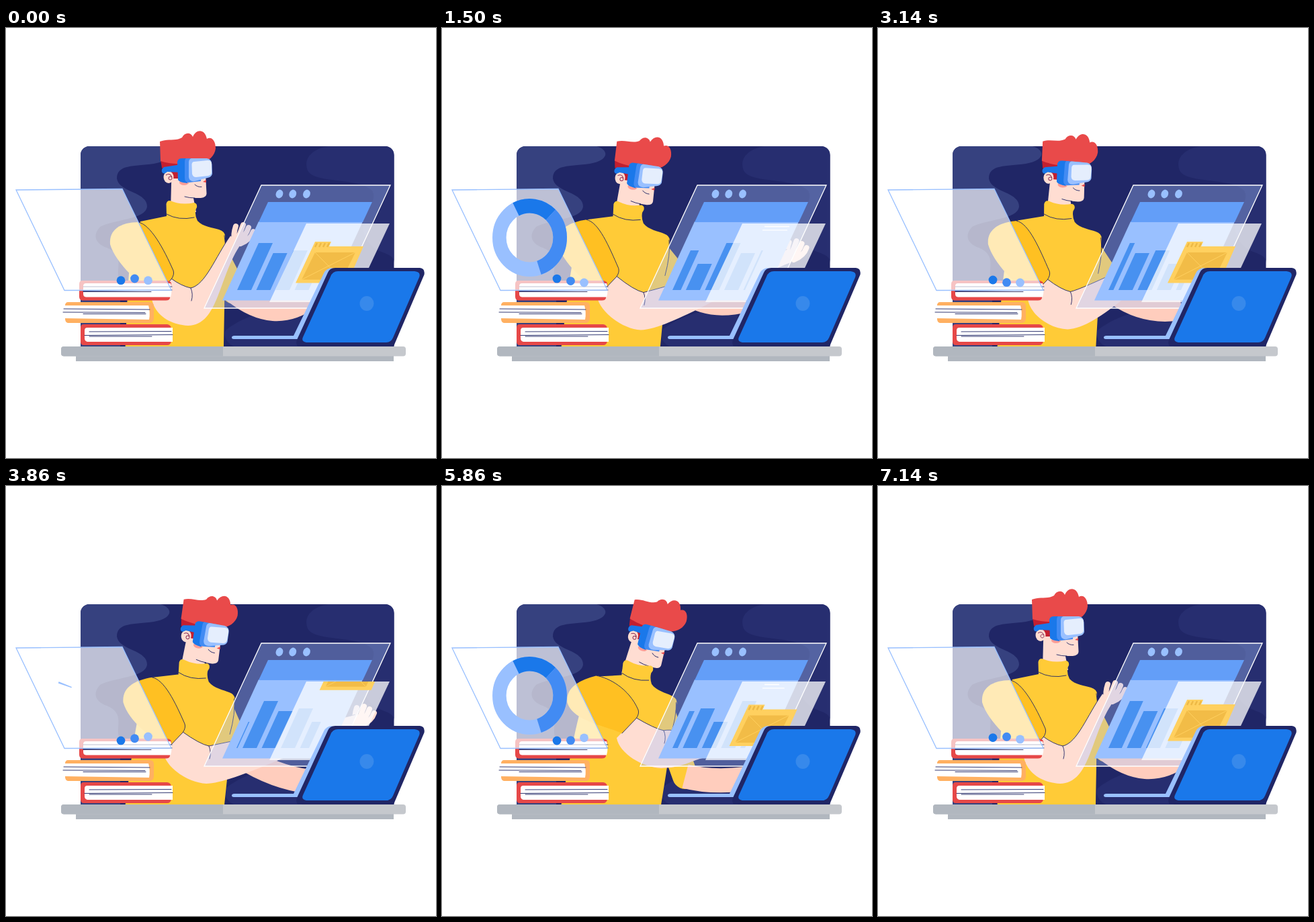
Animation, 640 px wide and 640 px high, one loop 7210 ms. Source, as an HTML page:

```html
<!DOCTYPE html>
<html lang="en">
<head>
<meta charset="utf-8">
<title>Virtual workspace</title>
<style>
html, body { margin: 0; width: 100%; height: 100%; overflow: hidden; background: #fff; }
svg { display: block; width: 100vw; height: 100vh; }
.ln { fill: none; stroke: #202666; stroke-width: .9; stroke-linecap: round; }
.ring circle { fill: none; stroke-width: 21.5; }
</style>
</head>
<body>
<svg viewBox="0 0 640 640" xmlns="http://www.w3.org/2000/svg">
  <defs>
    <clipPath id="screenClip"><rect x="111" y="176" width="466.500" height="310" rx="13"/></clipPath>
    <clipPath id="deskClip"><rect width="640" height="474"/></clipPath>
    <clipPath id="barClip"><rect x="343" y="300" width="108" height="90"/></clipPath>
    <clipPath id="cardClip"><path d="M447 291H571L516 408H392Z"/></clipPath>
    <mask id="ringMask" maskUnits="userSpaceOnUse" x="-70" y="-70" width="140" height="140">
      <circle id="reveal" r="47.200" fill="none" stroke="#fff" stroke-width="24" pathLength="360" transform="rotate(201) scale(1 -1)"/>
    </mask>
  </defs>

  <g clip-path="url(#deskClip)">
    <g clip-path="url(#screenClip)">
      <path fill="#202666" d="M111 176H578V474H111Z"/>
      <path fill="#36417f" d="M111 176H230C250 182 248 197 220 202C190 206 165 203 165 224C168 245 210 243 210 266C208 285 160 285 140 296C127 310 135 322 150 327C180 340 160 360 170 378V474H111Z"/>
      <path fill="#272e70" d="M480 176C455 180 442 195 449 212C458 232 525 222 545 242C556 262 520 280 535 310C545 340 578 330 578 350V176ZM328 449C360 425 400 415 440 420V474H340C328 470 322 455 328 449Z"/>
    </g>

    <path id="farSleeve" fill="none" stroke="#ffcb37" stroke-width="38" stroke-linecap="round"/>
    <path id="farArm" fill="none" stroke="#ffcdbd" stroke-width="36"/>
    <g id="face">
      <path fill="#ffddd2" d="M247 205L297 218L298.500 246Q299 252 290 253L279 253L283 274H245L246 232Z"/>
      <ellipse cx="265" cy="230" rx="7" ry="4" fill="#ff9d96"/>
      <path class="ln" d="M266 251Q273 253 281 253M281 233Q285 237 291 236.500"/>
      <path d="M293 229L298 226V230Z" fill="#e94a4a"/>
    </g>
    <g id="torso">
      <path fill="#ffcb37" d="M239 280L238.500 262Q240 255 247 258Q262 264 280 260Q285 261 284 267L282 271Q281 279 285 287C293 296 308 297 317 300Q327 303 326 312L325 417L323.500 500H176C182 420 178 330 200 288Z"/>
      <path class="ln" d="M239 277Q257 287 280 282M325 309Q329 330 323 362"/>
    </g>
    <path id="arm" fill="#ffddd2"/>
    <path id="fingers" fill="none" stroke="#ffddd2" stroke-width="8" stroke-linecap="round"/>
    <path id="armLine" class="ln"/>
    <path id="sleeve" fill="#ffc022"/>
    <path id="sleeveLine" class="ln"/>
    <g id="hair">
      <path fill="#c31f2f" d="M230 196L260 200L256 224H247L232 208Z"/>
      <path fill="#e94a4a" d="M229 169C240 164 252 169 262 163C266 155 275 155 278 162C283 150 296 150 299 165C306 161 312 168 312 179C311 190 302 199 288 201C276 203 248 204 230 198Z"/>
      <ellipse cx="242" cy="222" rx="7.500" ry="9" fill="#ffddd2"/>
      <path d="M238 219Q244 215 247 222M244.500 221a2.500 2.500 0 1 0 .1 0" fill="none" stroke="#8b2b52"/>
      <path fill="#1a78ea" d="M235 207L260 203V215L240 214Q234 219 232 214Q231 210 235 207Z"/>
    </g>
    <g id="goggles">
      <path fill="#1a78ea" d="M255 199Q256 194 262 194H272L270 231Q258 230 256 226Z"/>
      <path fill="#428bf3" d="M268 194H290V228L272 230Q266 230 266 223V200Q266 195 268 194Z"/>
      <path fill="#99c0ff" d="M276 194H299Q306 195 306.500 203L307 217Q306 222 300 223L281 228Q273 229 272 222V200Q272 195 276 194Z"/>
      <path fill="#e5eefd" d="M280 199L300 197Q306 197 306 202V214Q306 219 301 220L283 222Q278 222 277 217L276.500 203Q277 199 280 199Z"/>
    </g>
  </g>

  <path fill="#b1b7bf" d="M104 487H577V496H104Z"/>
  <rect x="82" y="474" width="513" height="14.500" rx="4" fill="#c5c8cd"/>
  <path fill="#b1b7bf" d="M86 474H323V488.500H86Q82 488 82 484V478Q82 474 86 474Z"/>

  <path fill="#e64848" d="M114 376H240Q247 377 246 382L244 402Q243 405.500 238 405.500H114Q109 405 109 400V381Q109 376 114 376ZM116 441H240Q246 442 246 448V466Q245 472 240 472H116Q111 472 111 467V446Q111 441 116 441Z"/>
  <path fill="#ffb061" d="M92 408H214Q220 408 220 414V433Q219 439 213 439H92Q88 438 88 433V412Q89 408 92 408Z"/>
  <path fill="#fff" d="M119 380H245Q248 390 245 400.500H119Q115 400 115 396V384Q115 380 119 380ZM85 413H212Q215 423 213 434L86 432ZM121 446H248V467H121Q117 466 117 462V450Q117 446 121 446Z"/>
  <path class="ln" d="M115 385H247M115 391.500L247 390M115 392.500H216M86 418L214 419M85 423L207 423.500M115 425.500H208M124 452L246 451.500M117 457.500L248 456.500M124 459H217"/>

  <path d="M15 241L173 239.500L246 390L87 390.500Z" fill="#fff" fill-opacity=".67" stroke="#99c0ff" stroke-width="1.300"/>
  <g class="ring" transform="translate(130.500 312) scale(.957 1)">
    <g mask="url(#ringMask)">
      <circle r="47.200" stroke="#99c0ff"/>
      <circle r="47.200" stroke="#1a78ea" pathLength="360" stroke-dasharray="71 400" transform="rotate(243)"/>
      <circle r="47.200" stroke="#428bf3" pathLength="360" stroke-dasharray="118 400" transform="rotate(314)"/>
    </g>
  </g>
  <g id="dots">
    <circle cx="171" r="6.400" fill="#1a78ea"/>
    <circle cx="191.500" r="6.400" fill="#428bf3"/>
    <circle cx="211.500" r="6.400" fill="#99c0ff"/>
  </g>

  <path d="M380 234H572L487 417H295Z" fill="#a9c6ff" fill-opacity=".35" stroke="#fff" stroke-width="1.300"/>
  <g fill="#99c0ff">
    <ellipse rx="5.300" ry="6.500" transform="translate(407 247) rotate(20)"/>
    <ellipse rx="5.300" ry="6.500" transform="translate(426.800 247) rotate(20)"/>
    <ellipse rx="5.300" ry="6.500" transform="translate(447.500 247) rotate(20)"/>
  </g>
  <path fill="#99c0ff" d="M376 288H531L477 405.500H322Z"/>
  <path fill="#639ef8" d="M390 259H545L531 289H376Z"/>
  <g transform="translate(178.200 0) skewX(-24.560)">
    <g clip-path="url(#barClip)"><g id="bars" fill="#4891f0"></g></g>
  </g>
  <path fill="#fff" fill-opacity=".75" d="M447 291H571L516 408H392Z"/>
  <path id="lines" stroke="#fff" stroke-width="1.300"/>
  <g clip-path="url(#cardClip)">
    <g id="folder">
      <path fill="#ffd05f" d="M460 318H484L481 325H532L508 379.500H431Z"/>
      <path fill="#f2bc47" d="M460 334H520L500 374.500H440Z"/>
      <path d="M460 334L500 374.500M520 334L440 374.500" fill="none" stroke="#ffd05f"/>
      <path d="M463 320L460 326M469 320L466 326M475 320L472 326M481 320L478 326" stroke="#eeb945" stroke-width="2.500"/>
    </g>
  </g>

  <path fill="#99c0ff" d="M473 365Q477 357 486 357L440 463H339Q336 463 336 460.500Q336 458 340 458H428Z"/>
  <path fill="#202666" d="M479 364Q482 357 490 357H616Q624 358 622.500 367L577 473.500H434Q431 470 433 464Z"/>
  <path fill="#1a78ea" d="M494 362H608Q618 363 615 371L576 461Q573 468 566 468H447Q439 467 442 460L483 370Q486 362 494 362Z"/>
  <ellipse cx="537" cy="410" rx="10.500" ry="11" fill="#3789eb"/>
</svg>
<script>
const LOOP = 7210, HALF = LOOP / 2;
const $ = id => document.getElementById(id);
const clamp = x => Math.max(0, Math.min(1, x));
const smooth = x => (x = clamp(x)) * x * (3 - 2 * x);
const span = (t, from, to) => clamp((t - from) / (to - from));
const set = (id, name, value) => $(id).setAttribute(name, value);

// time, lean, sleeve corner, elbow crease, hand, far elbow, far arm bend y, far wrist y
const poses = [
  [0, 0, 249, 365, 275, 387, 342, 315, 340, 392, 440, 400],
  [570, .51, 271, 353, 311, 375, 468, 280, 370, 395, 418, 405],
  [850, .52, 270, 354, 310, 377, 478, 272, 370, 395, 418, 405],
  [1640, .52, 262, 362, 299, 395, 520, 345, 368, 395, 418, 405],
  [2430, .39, 256, 367, 288, 397, 470, 330, 370, 393, 416, 405],
  [2830, .18, 252, 368, 282, 394, 430, 320, 358, 394, 424, 410],
  [3860, .59, 266, 358, 302, 387, 522, 350, 350, 402, 434, 440],
  [4600, .98, 288, 347, 324, 376, 440, 385, 362, 430, 442, 436],
  [5070, 1, 290, 345, 326, 374, 430, 390, 362, 432, 442, 436],
  [5860, .95, 292, 337, 330, 364, 430, 390, 362, 432, 442, 436],
  [6950, 0, 249, 365, 275, 387, 342, 315, 340, 392, 440, 400]
];

function poseAt(t) {
  let i = poses.length - 1;
  while (poses[i][0] > t) i--;
  const a = poses[i], b = poses[i + 1];
  if (!b) return a;
  const k = smooth(span(t, a[0], b[0]));
  return a.map((v, j) => v + (b[j] - v) * k);
}

const barHeights = [70, 55, 59, 39], barStep = 28.5;
for (let i = 0; i < 9; i++) {
  const r = document.createElementNS("http://www.w3.org/2000/svg", "rect"), h = barHeights[i % 4];
  Object.entries({ x: i * barStep, y: 390 - h, width: 21, height: h })
    .forEach(([name, value]) => r.setAttribute(name, value));
  $("bars").append(r);
}

function drawPerson(t) {
  const [, u, sx, sy, cx, cy, hx, hy, kx, ky, my, wy] = poseAt(t);
  const turn = `rotate(${17 * u} 256 195)`;
  set("face", "transform", `translate(${46 * u} ${11 * u}) ${turn}`);
  set("goggles", "transform", `translate(${46 * u} ${11 * u}) ${turn}`);
  set("hair", "transform", `translate(${52 * u} ${7 * u}) ${turn}`);
  set("torso", "transform", `translate(0 ${4 * u}) rotate(${8.5 * u} 270 480)`);

  set("farSleeve", "d", `M${306 + 24 * u} ${326 + 14 * u}L${kx} ${ky}`);
  set("farArm", "d", `M${kx} ${ky}Q400 ${my} 452 ${wy}`);

  const ex = cx - 2, ey = cy + 27, len = Math.hypot(hx - ex, hy - ey);
  const dx = (hx - ex) / len, dy = (hy - ey) / len;
  const tx = hx + dy * 10, ty = hy - dx * 10, bx = hx - dy * 10, by = hy + dx * 10;
  const top = `M${sx - 3} ${sy + 8}Q${cx - 14} ${cy - 3} ${cx} ${cy}` +
    `C${cx + 22} ${cy - 5} ${tx - dx * 40} ${ty - dy * 40} ${tx} ${ty}`;
  set("arm", "d", `${top}L${bx} ${by}C${bx - dx * 60} ${by - dy * 60} ${cx + 42} ${cy + 55} ${cx - 4} ${cy + 56}` +
    `C${cx - 30} ${cy + 55} ${sx - 28} ${sy + 62} ${sx - 32} ${sy + 38}Z`);
  set("armLine", "d", `${top}M${cx} ${cy}Q${cx + 4} ${cy + 9} ${cx + 1} ${cy + 19}`);
  set("fingers", "d", [[0, -20], [11, -22], [19, -18], [26, -12]]
    .map(([x, y], i) => `M${hx + i * 3 - 2} ${hy + i * 2}Q${hx + x - 4} ${hy + y + 12} ${hx + x} ${hy + y}`).join(""));

  const px = 197 + 35 * u, py = 289 - 7 * u, lx = 155 + 33 * u;
  const seam = `M${px} ${py}C${px + 18} ${py + 3} ${sx - 14} ${sy - 36} ${sx} ${sy - 4}Q${sx + 2} ${sy + 2} ${sx - 3} ${sy + 9}`;
  const cuff = `L${sx - 24} ${sy + 31}`;
  const under = `C${sx - 48} ${sy + 20} ${lx + 8} 350 ${lx} 322`;
  set("sleeve", "d", `${seam}${cuff}${under}C${lx - 2} 300 ${px - 26} 289 ${px} ${py}Z`);
  set("sleeveLine", "d", `${seam}${cuff}`);
}

function drawPanels(t) {
  const p = t % HALF;
  const arc = 360 * span(p, 248, 1350) * (1 - smooth(span(p, 2440, 2840)));
  set("reveal", "stroke-dasharray", `${arc} 800`);
  set("reveal", "opacity", arc > 0 ? 1 : 0);

  const slide = p < 1500 ? -95 * smooth(p / 360) : 95 * (1 - smooth(span(p, 1800, 2350)));
  set("folder", "transform", `translate(${-slide * .47} ${slide})`);

  const l1 = 37 * (span(p, 250, 740) - span(p, 1990, 2640));
  const l2 = 37 * (span(p, 460, 960) - span(p, 2180, 2830));
  set("lines", "d", `M480 295.500h${l1}M477 300.800h${l2}`);

  set("bars", "transform", `translate(${230 + (p / HALF) * 114} 0)`);

  const beat = LOOP / 4;
  [...$("dots").children].forEach((dot, i) => {
    let x = t / beat - (i - 1) * .14;
    x -= Math.round(x);
    const lift = Math.abs(x) < .3 ? Math.cos(x / .3 * Math.PI / 2) ** 2 : 0;
    dot.setAttribute("cy", 379 - 6 * lift);
  });
}

const start = performance.now();
function tick() {
  const t = (performance.now() - start) % LOOP;
  drawPerson(t);
  drawPanels(t);
  requestAnimationFrame(tick);
}
tick();
</script>
</body>
</html>
```
